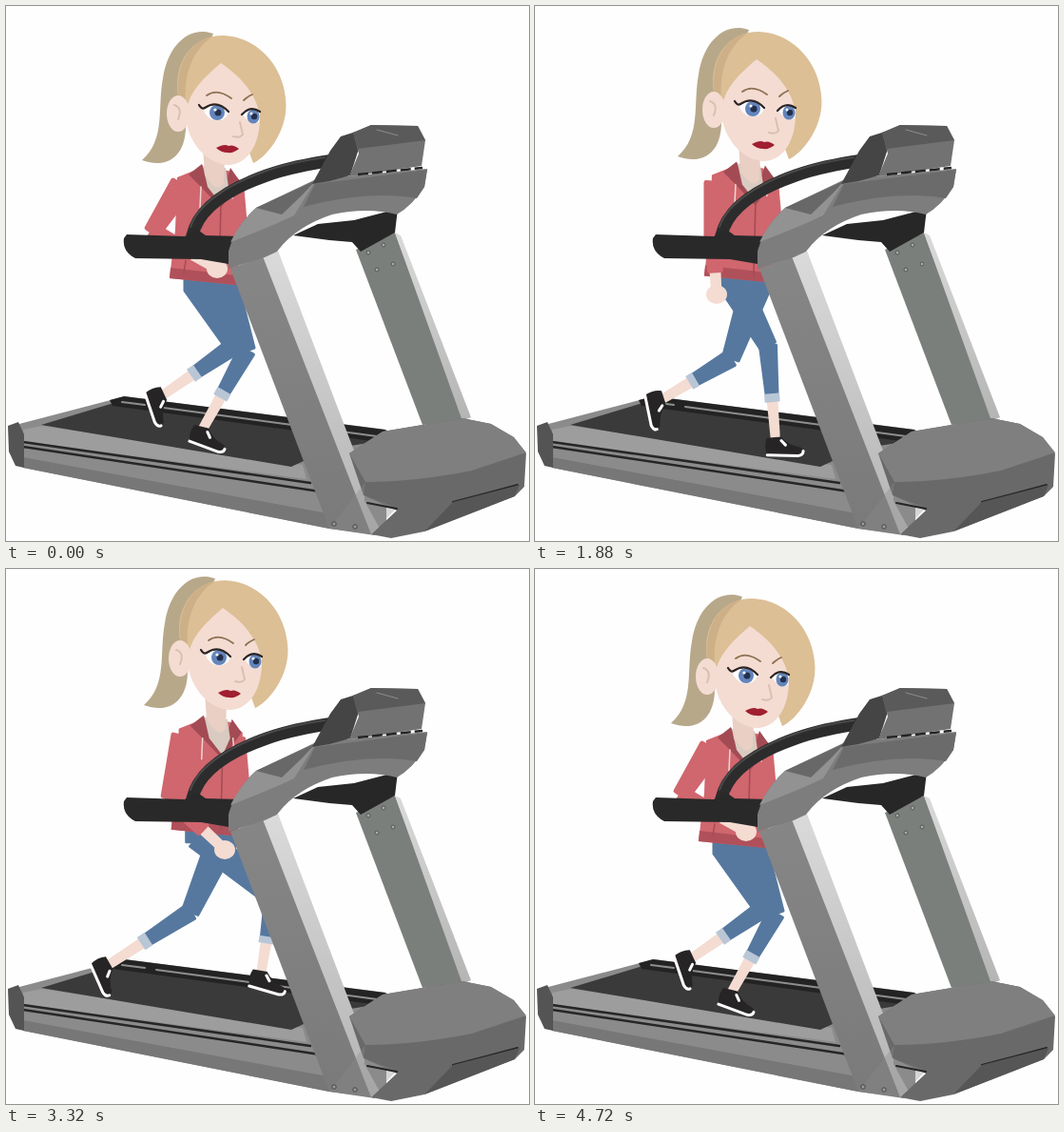
An HTML page for the animation above (4760 ms loop, 550 by 562 pixels).

```html
<!DOCTYPE html>
<html lang="en">
<head>
<meta charset="utf-8">
<title>Treadmill run</title>
<style>
  html, body { margin: 0; width: 100%; height: 100%; overflow: hidden; background: #fefefe; }
  svg { display: block; width: 100vw; height: 100vh; }
  .jeans { fill: #56789f; stroke: #56789f; stroke-width: 3; stroke-linejoin: round; }
  .cuff { fill: #b9c6d6; }
  .skin { fill: #f4dcd2; }
  .sleeve { fill: #d0666e; stroke: #d0666e; stroke-width: 5; stroke-linejoin: round; }
  .line { fill: none; stroke-linecap: round; }
</style>
</head>
<body>
<svg viewBox="0 0 550 562">
  <defs>
    <g id="shoe">
      <path fill="#262424" d="M-9-4L6-4Q13 6 26 9Q31 15 24 17L-10 14Q-13 4-9-4Z"/>
      <path class="line" stroke="#fff" stroke-width="3" d="M-10 14L22 17.500Q28 17 28 13M6 0L10 5"/>
    </g>
    <linearGradient id="post" x2="0" y2="1"><stop stop-color="#868686"/><stop offset="1" stop-color="#7a7a7a"/></linearGradient>
    <linearGradient id="strip" x2="0" y2="1"><stop stop-color="#dadada"/><stop offset="1" stop-color="#b4b4b4"/></linearGradient>
  </defs>

  <!-- deck, far post, far handle -->
  <path fill="#8b8b8b" d="M14 439L110 414L125 410L400 445L400 556L340 549L18 485Z"/>
  <path fill="#9d9d9d" d="M18 445L38 441L312 482L316 497L18 457Z"/>
  <path fill="#3b3a3a" d="M37 440L110 418L300 440L425 452L362 462L313 478L300 484Z"/>
  <path fill="#232323" d="M109 414L124 410L398 445L420 455L384 457L112 420Z"/>
  <path class="line" stroke="#8e8e8e" stroke-width="2" d="M122 416L146 419M158 421L390 452"/>
  <path class="line" stroke="#262626" stroke-width="2.500" d="M18 458L320 501M18 463L330 510"/>
  <path fill="#777" d="M18 474L338 533L340 549L18 485Z"/>
  <path fill="#545454" d="M2 441L13 437L19 450L19 485L10 483L3 468Z"/>
  <path fill="#7b7f7c" d="M368 256L409 238L482 434L438 440Z"/>
  <path fill="url(#strip)" d="M409 238L415 241L489 432L480 436Z"/>
  <g fill="#aaa" stroke="#555"><circle cx="381" cy="259" r="2"/><circle cx="397" cy="251" r="2"/><circle cx="390" cy="277" r="2"/><circle cx="407" cy="271" r="2"/></g>
  <path fill="#272727" d="M302 241L328 229L366 225L412 213L409 238L373 258L364 248L340 246Z"/>

  <!-- runner -->
  <path id="farArm" class="sleeve"/>
  <circle id="farHand" class="skin" r="13"/>
  <g id="farLeg"></g>
  <path id="pelvis" class="jeans"/>
  <g id="nearLeg"></g>
  <g id="torso">
    <path fill="#d0666e" d="M180 180L205 170L234 173L247 184L249 240L242 293L172 286L178 235Z"/>
    <path fill="#b0505a" d="M173 275L243 283L242 293L172 286Z"/>
    <path fill="#a34b54" d="M192 177L206 166L214 184L224 205L236 170L246 184L226 212L205 190Z"/>
    <path fill="#d9cbc1" d="M207 168L231 170L234 190L226 208L212 190Z"/>
    <path class="line" stroke="#a34b54" stroke-width="1.500" d="M226 208L224 286M190 262L187 280"/>
    <path class="line" stroke="#eed6d2" stroke-width="1.500" d="M205 190L204 212M237 190L238 202"/>
  </g>
  <g id="nearArm"></g>
  <g id="head">
    <path fill="#e9cfc4" d="M207 148L230 160L229 186Q222 198 209 178Z"/>
    <path fill="#b8a88a" d="M218 29C192 20 170 42 165 76C159 108 168 140 143 162C168 171 188 160 189 128L205 60Z"/>
    <path fill="#dcbf95" d="M184 108C171 66 192 31 228 31C268 32 296 70 294 106C292 132 278 156 260 165L236 100Z"/>
    <path fill="#cdb088" d="M184 108C174 68 190 38 217 32C194 48 185 76 190 110Z"/>
    <ellipse class="skin" cx="181" cy="113" rx="12" ry="19"/>
    <path class="skin" d="M226 60C207 76 190 92 189 116C191 146 214 167 234 167C256 166 268 142 267 114C262 90 244 72 226 60Z"/>
    <path fill="#dcbf95" d="M226 59C254 76 272 104 266 134Q266 154 260 165C284 150 297 122 294 98C288 55 255 31 222 40Z"/>
    <path class="line" stroke="#dcbfb3" stroke-width="2" d="M177 104Q186 107 181 119M246 122L249 135Q246 139 239 137"/>
    <path fill="#fff" d="M207 108Q221 96 234 112Q230 122 219 120Q211 118 207 108ZM249 114Q257 104 267 112L266 122Q255 124 249 114Z"/>
    <g fill="#6485bb"><circle cx="222" cy="112" r="8"/><ellipse cx="260" cy="116" rx="6.500" ry="7.500"/></g>
    <g fill="#23304c"><circle cx="223" cy="112" r="3.500"/><circle cx="261" cy="116" r="3.200"/></g>
    <g fill="#fff"><circle cx="220" cy="109" r="1.600"/><circle cx="258" cy="113" r="1.500"/></g>
    <path class="line" stroke="#2c2424" stroke-width="2.200" d="M203 104Q206 109 209 107Q222 98 234 111M248 114Q257 104 267 111"/>
    <path class="line" stroke="#8d7154" stroke-width="1.800" d="M211 94Q222 86 237 97M250 99Q254 95 259 93"/>
    <path fill="#a01f30" d="M221 149Q230 144 234 147Q239 145 245 150Q239 155 233 154Q226 154 221 149Z"/>
  </g>

  <!-- near handle, console, post, motor cover -->
  <path class="line" stroke="#2c2c2c" stroke-width="13" d="M196 241C203 210 240 190 274 178Q302 168 345 162"/>
  <path class="line" stroke="#494949" stroke-width="2" d="M194 232C203 205 240 185 274 173Q300 164 335 159"/>
  <path fill="#292929" d="M127 240L188 242L200 234L210 241L248 242L240 272L205 266L136 265Q122 258 124 244Z"/>
  <path fill="url(#post)" d="M236 276L273 262L388 556L340 549Z"/>
  <path fill="url(#strip)" d="M270 263L286 257L377 496L377 520L397 556L384 555Z"/>
  <path fill="#7d7d7d" d="M234 276V258Q240 232 263 212L326 182L443 171L440 190Q427 210 411 219Q380 211 343 219Q304 232 285 258L272 264Z"/>
  <path fill="#929292" d="M263 212L326 183L303 220Q278 232 236 248Q246 228 263 212Z"/>
  <path fill="#686868" d="M263 212L326 183L312 198L290 219Z"/>
  <path fill="#6b6b6b" d="M325 187L443 172L440 190L432 202Q380 193 313 211Z"/>
  <path fill="#454545" d="M322 187L341 152L352 137L368 132L371 150L362 178L340 184Z"/>
  <path fill="#727272" d="M365 133L384 125L433 126L441 141L437 168L361 179L371 155Z"/>
  <path fill="#5a5a5a" d="M365 133L384 125L433 126L441 141L370 150Z"/>
  <path stroke="#242424" stroke-width="2.500" stroke-dasharray="11 4" d="M370 177L438 170"/>
  <path class="line" stroke="#8d8d8d" d="M390 130L412 136"/>

  <path fill="#696969" d="M361 470L396 447L480 433L510 439L534 453L547 470L545 505L535 515L440 552L405 559L384 555L411 530L376 514Z"/>
  <path fill="#7f7f7f" d="M361 470L396 447L480 433L510 439L534 453L547 469L490 488Q430 500 378 500Z"/>
  <path fill="#8b8b8b" d="M378 500L376 514L411 527L384 555L340 549Z" opacity=".35"/>
  <path class="line" stroke="#252525" stroke-width="2" d="M380 522L411 528M470 521L538 503"/>
  <path fill="#565656" d="M440 552L470 521L540 503L535 515Z"/>
  <g fill="#999" stroke="#444"><circle cx="345" cy="544" r="2.200"/><circle cx="367" cy="547" r="2.200"/></g>
</svg>
<script>
const LOOP = 4760, CYCLES = 6, POSES = 12;

// One stride: knee x, y, ankle x, y, foot angle. The far leg is half a stride away.
const stride = [
  [240, 357, 163, 410, 65], [272, 354, 190, 408, 70], [285, 348, 230, 414, 45],
  [281, 346, 268, 426, 10], [266, 350, 286, 438, -8], [245, 357, 253, 457, -5],
  [253, 362, 206, 446, 14], [232, 360, 177, 438, 25], [213, 362, 139, 428, 45],
  [194, 360, 106, 417, 60], [184, 357, 103, 412, 65], [206, 370, 132, 414, 72]
];
// Near elbow x, y and hand x, y.
const swing = [
  [154, 237, 222, 276], [160, 240, 238, 283], [165, 240, 244, 288], [172, 240, 230, 295],
  [182, 240, 205, 302], [187, 240, 191, 303], [177, 240, 215, 296], [171, 240, 238, 289],
  [156, 228, 200, 292], [142, 216, 156, 288], [136, 210, 138, 282], [142, 222, 170, 284]
];
// Head offset over one step.
const bob = [[0, 0], [3, -9], [3, -15], [2, -19], [3, -17], [7, -4]];

const $ = id => document.getElementById(id);
const mix = (a, b, k) => [a[0] + (b[0] - a[0]) * k, a[1] + (b[1] - a[1]) * k];

function limb(a, b, wa, wb) {
  const d = Math.hypot(b[0] - a[0], b[1] - a[1]) || 1;
  const nx = (a[1] - b[1]) / d / 2, ny = (b[0] - a[0]) / d / 2;
  const corner = (p, w) => `${p[0] + nx * w} ${p[1] + ny * w}`;
  return `M${corner(a, wa)}L${corner(b, wb)}L${corner(b, -wb)}L${corner(a, -wa)}Z`;
}
const shape = (cls, d) => `<path class="${cls}" d="${d}"/>`;

function leg(hip, [kx, ky, ax, ay, angle]) {
  const knee = [kx, ky], ankle = [ax, ay];
  const hem = mix(knee, ankle, .5), cuff = mix(knee, ankle, .59);
  return shape('skin', limb(hem, ankle, 12, 10)) +
    `<use href="#shoe" transform="translate(${ax} ${ay}) rotate(${angle})"/>` +
    shape('jeans', limb(hip, knee, 31, 17)) +
    shape('jeans', limb(knee, hem, 17, 12)) +
    shape('cuff', limb(hem, cuff, 16, 16));
}

function arm(shoulder, [ex, ey, hx, hy]) {
  const elbow = [ex, ey], hand = [hx, hy], wrist = mix(elbow, hand, .6);
  return shape('skin', limb(wrist, hand, 12, 11)) +
    `<ellipse class="skin" cx="${hx}" cy="${hy}" rx="11" ry="10"/>` +
    shape('sleeve', limb(shoulder, elbow, 22, 14)) +
    shape('sleeve', limb(elbow, wrist, 14, 12));
}

function draw(n) {
  const [dx, dy] = bob[n % 6], tx = dx * .85, ty = dy * .65;
  const at = (x, y) => [x + tx, y + ty];
  const near = at(202, 292), far = at(228, 292);
  const reach = 250 + 58 * Math.cos((n - 7) * Math.PI / 6);
  $('head').setAttribute('transform', `translate(${dx} ${dy})`);
  $('torso').setAttribute('transform', `translate(${tx} ${ty})`);
  $('nearLeg').innerHTML = leg(near, stride[n]);
  $('farLeg').innerHTML = leg(far, stride[(n + 6) % POSES]);
  $('pelvis').setAttribute('d', limb(at(188, 290), at(240, 290), 18, 18));
  $('nearArm').innerHTML = arm(at(185, 189), swing[n]);
  $('farArm').setAttribute('d', limb(at(240, 192), at(n > 8 && n < 12 ? 264 : 246, 238), 16, 12));
  $('farHand').setAttribute('cx', reach);
  $('farHand').setAttribute('cy', 291);
}

let shown = -1;
function tick() {
  const turn = performance.now() % LOOP / LOOP * CYCLES;
  const n = Math.floor(turn * POSES + .88) % POSES;
  if (n !== shown) draw(shown = n);
  requestAnimationFrame(tick);
}
tick();
</script>
</body>
</html>
```
